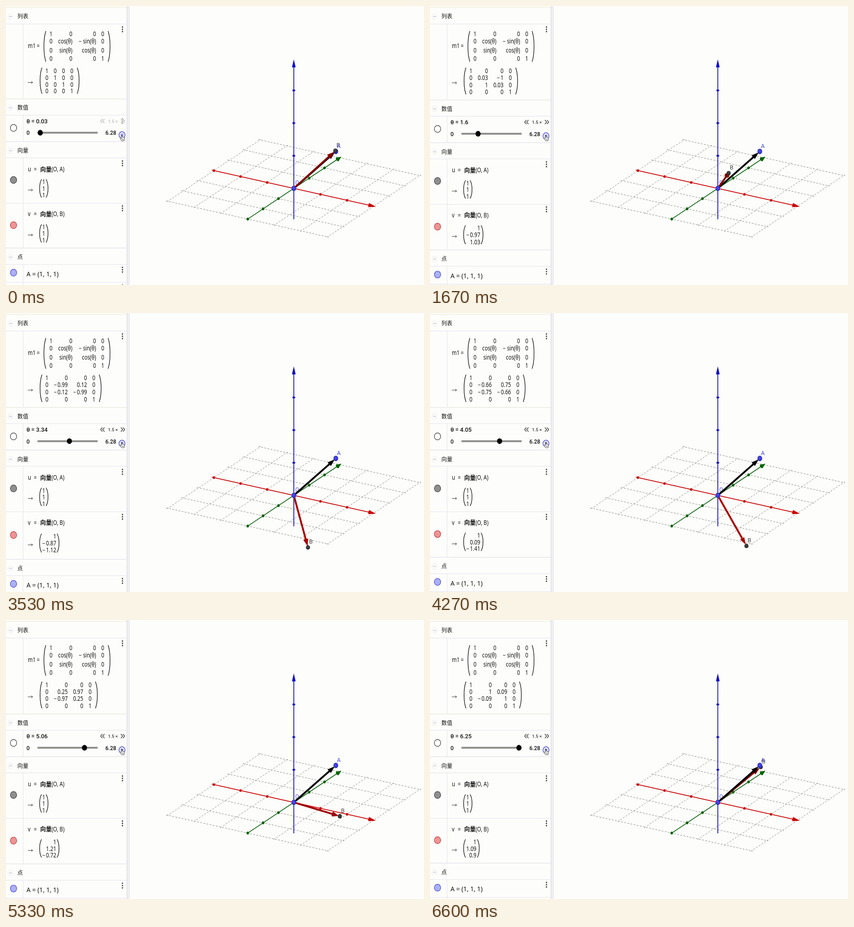
Write an HTML page with a canvas that moves like this. It is 917 px wide and 611 px high and loops after 6.67 s.

```html
<!DOCTYPE html>
<html lang="zh-CN">
<head>
<meta charset="utf-8">
<style>
  html, body { margin: 0; width: 100%; height: 100%; overflow: hidden; background: #fdfdfb; }
  canvas { display: block; }
</style>
</head>
<body>
<canvas id="stage" width="917" height="611"></canvas>
<script>
const c = document.getElementById('stage').getContext('2d');
const LOOP = 6670;
const UI = 'Roboto, "Liberation Sans", Arial, sans-serif';
const MATH = '"Noto Sans", "Open Sans", sans-serif';
const CJK = '"Noto Sans CJK SC", "Noto Sans CJK JP", sans-serif';
const SQUEEZE = 0.82; // aspect of the math type
const MATH_SIZE = 13.7;
const INK = '#111';

// step, slider angle, drawn angle, angle in the matrices (which lag behind)
const KEYS = [
  [0, .03, .03, 0], [11, .72, .72, .657], [25, 1.6, 1.6, 1.541], [42, 2.64, 2.61, 2.54],
  [64, 4.05, 4.02, 3.991], [80, 5.06, 5.03, 4.96], [99, 6.25, 6.22, 6.19]
];

function anglesAt(n) {
  const i = Math.max(1, KEYS.findIndex(k => k[0] >= n));
  const a = KEYS[i - 1], b = KEYS[i], f = (n - a[0]) / (b[0] - a[0]);
  return [1, 2, 3].map(j => a[j] + (b[j] - a[j]) * f);
}

// ---- drawing helpers ----
function text(s, x, y, size = 12.8, family = UI, color = INK, align = 'left', weight = 500) {
  c.font = `${weight} ${size}px ${family}`;
  c.fillStyle = color;
  c.textAlign = align;
  c.fillText(s, x, y + size * .36);
}

function math(s, x, y, align = 'left') {
  c.save();
  c.translate(x, y);
  c.scale(SQUEEZE, 1);
  text(s, 0, 0, MATH_SIZE, MATH, INK, align, 400);
  c.restore();
}

function mathWidth(s) {
  c.font = `400 ${MATH_SIZE}px ${MATH}`;
  return c.measureText(s).width * SQUEEZE;
}

function line(x0, y0, x1, y1, color, width = 1, dash = []) {
  c.strokeStyle = color;
  c.lineWidth = width;
  c.setLineDash(dash);
  c.beginPath();
  c.moveTo(x0, y0);
  c.lineTo(x1, y1);
  c.stroke();
  c.setLineDash([]);
}

function poly(points, color, width = 1.3) {
  c.strokeStyle = color;
  c.lineWidth = width;
  c.beginPath();
  points.forEach(p => c.lineTo(...p));
  c.stroke();
}

function oval(x, y, rx, ry, fill, stroke, width = 1.2) {
  c.beginPath();
  c.ellipse(x, y, rx, ry, 0, 0, 7);
  c.fillStyle = fill;
  c.fill();
  if (!stroke) return;
  c.strokeStyle = stroke;
  c.lineWidth = width;
  c.stroke();
}

function paren(x, top, bottom, dir) {
  const bend = (bottom - top) * .25, e = x + 4.5 * dir, m = x - 1.2 * dir;
  c.strokeStyle = INK;
  c.lineWidth = 1.3;
  c.beginPath();
  c.moveTo(e, top);
  c.bezierCurveTo(m, top + bend, m, bottom - bend, e, bottom);
  c.stroke();
}

function yields(y) {
  line(48, y, 58, y, '#333');
  poly([[55.5, y - 2.5], [58.5, y], [55.5, y + 2.5]], '#333', 1);
}

function dots(y, color = '#444') {
  for (const d of [-5, 0, 5]) oval(255.5, y + d, 1.5, 1.7, color);
}

const fmt = v => String(+v.toFixed(2) || 0).replace('-', '−\u2009');
const hasMinus = row => row.some(s => s[0] === '−');

// ---- panel ----
function rule(y, color = '#d6d6ea') {
  line(0, y, 265, y, color, 1, [2, 1]);
}

function header(s, y) {
  c.setLineDash([2, 1.5]);
  oval(10, y, 5.5, 6, '#fdfdfb', '#dcdce4', 1);
  c.setLineDash([]);
  line(7, y, 13, y, '#a8a8c4', 1.1);
  text(s, 25, y, 12, CJK);
}

function gutter(y0, y1) {
  line(37.5, y0, 37.5, y1, '#d8d8e4', 1, [2, 1]);
}

function vectorRow(name, point, y, column, nudge = 0, lag = 0) {
  math(name, 48, y);
  math('=', 61, y);
  text('向量', 75, y, 12.6, CJK, INK, 'left', 700);
  math(`(O, ${point})`, 100, y);
  yields(y + 46 + lag);
  const right = 79.5 + Math.max(...column.map(mathWidth));
  let rowY = y + 28.5 + nudge;
  const top = rowY - 6;
  column.forEach((s, i) => {
    math(s, right, rowY, 'right');
    if (i < 2) rowY += 14.5 + (hasMinus([s]) ? 1.3 : 0);
  });
  paren(73.5, top, rowY + 5, 1);
  paren(right + 6.5, top, rowY + 5, -1);
}

function matrixRow(a) {
  math('m1', 48, 87);
  math('=', 67.5, 87);
  paren(83, 55, 122, 1);
  paren(228.5, 55, 122, -1);
  const formula = [['1', '0', '0', '0'], ['0', 'cos(θ)', '− sin(θ)', '0'],
    ['0', 'sin(θ)', 'cos(θ)', '0'], ['0', '0', '0', '1']];
  formula.forEach((row, i) => row.forEach((s, j) =>
    math(s, [102, 145.5, 197.5, 215.5][j], [61, 77.5, 97, 115][i], 'right')));

  const co = Math.cos(a), si = Math.sin(a);
  const rows = [[1, 0, 0, 0], [0, co, -si, 0], [0, si, co, 0], [0, 0, 0, 1]].map(r => r.map(fmt));
  const minuses = rows.filter(hasMinus).length;
  const rights = [];
  let x = 74.8;
  for (let j = 0; j < 4; j++) {
    x += 11.8 + Math.max(...rows.map(r => mathWidth(r[j])));
    rights.push(x);
  }
  let y = 142.3;
  for (const row of rows) {
    row.forEach((s, j) => math(s, rights[j], y, 'right'));
    y += 14.7 + (hasMinus(row) ? 1.3 : 0);
  }
  paren(74.5, 135, y - 9, 1);
  paren(x + 13, 135, y - 9, -1);
  yields(167.5 + minuses * .7);
  return [0, 2.3, 3.2][minuses];
}

function chevrons(x, y, dir, color) {
  for (const d of [0, 4.5])
    poly([[x + d + 2 * dir, y - 4.5], [x + d - 2 * dir, y], [x + d + 2 * dir, y + 4.5]], color);
}

function sliderRow(angle, s, idle) {
  const tone = idle ? '#b8b8b8' : '#333';
  oval(16.5, 267 + s, 7, 7.6, '#fff', '#333');
  text('θ = ' + fmt(angle), 45, 252 + s);
  chevrons(209.5, 252 + s, 1, tone);
  text('1.5 ×', 234.5, 252.5 + s, 9.8, UI, tone, 'center');
  chevrons(254, 252 + s, -1, tone);
  if (idle) dots(252, '#aaa');
  text('0', 45, 278 + s, 12.2);
  line(69, 277.5 + s, 201, 277.5 + s, '#8c8c88', 4);
  oval(74.6 + 19.28 * angle, 277.5 + s, 5.6, 6.2, '#000');
  text('6.28', 218, 278 + s, 12);
  oval(254.5, 282.5 + s, 6.5, 7.2, '#fff', '#4a4ac8', 1.5);
  line(252.7, 279 + s, 252.7, 286 + s, '#4a4ac8', 1.6);
  line(256.3, 279 + s, 256.3, 286 + s, '#4a4ac8', 1.6);
}

function hand() {
  c.beginPath();
  [[253, 283], [254.6, 283], [255, 287], [259, 288], [260, 290], [259, 295],
    [253.5, 295], [250.5, 290.5], [251.5, 289.5], [253, 290.5]].forEach(p => c.lineTo(...p));
  c.closePath();
  c.fillStyle = '#fff';
  c.fill();
  c.strokeStyle = '#444';
  c.lineWidth = 1;
  c.stroke();
  line(255, 290.5, 255, 293, '#555');
  line(257, 290.5, 257, 293, '#555');
}

function panel(angle, lagged, idle) {
  rule(3, '#dedeb0');
  header('列表', 23);
  rule(39.5);
  dots(51);
  const s = matrixRow(lagged);
  gutter(40, 203 + s);
  rule(203.5 + s, '#d4d4c0');
  header('数值', 223 + s);
  rule(239 + s);
  gutter(239 + s, 297 + s);
  sliderRow(angle, s, idle);
  rule(297 + s, '#c8c8e0');
  header('向量', 317 + s);
  rule(332.5 + s);

  const co = Math.cos(lagged), si = Math.sin(lagged);
  const column = [1, co - si, si + co].map(fmt);
  const minuses = column.filter(v => hasMinus([v])).length;
  const extra = [0, 1.8, 6][minuses], end = s + extra;
  gutter(333 + s, 530 + end);
  oval(16.5, 381 + s, 7, 7.6, '#8f8f8f', '#444');
  vectorRow('u', 'A', 357 + s, ['1', '1', '1']);
  dots(344.5 + s);
  rule(432 + s);
  oval(16.5, 480 + s + extra / 2, 7, 7.6, '#ee9494', '#c23c3c');
  vectorRow('v', 'B', 455.5 + s, column, minuses === 2 ? 2 : 0, extra / 2);
  dots(443 + s);
  rule(530 + end, '#c8c8e0');
  header('点', 550 + end);
  rule(566 + end);
  gutter(566 + end, 611);
  oval(16.5, 584 + end, 7, 7.6, '#aab0fa', '#4a4ad0');
  text('A = (1, 1, 1)', 45, 587 + end, 13.8, MATH);
  dots(577.5 + end);
  rule(605 + end);
  dots(616.5 + end);
  hand();

  c.fillStyle = '#f1f1f6';
  c.fillRect(265, 0, 6, 611);
  line(265.5, 0, 265.5, 611, '#d2d2de');
  line(270.5, 0, 270.5, 611, '#dedee6');
}

// ---- 3D view ----
const OX = 631.4, OY = 399.4;
const project = (x, y, z) => [OX + 58.4 * x + 33.7 * y, OY + 13 * x - 22.4 * y - 71.5 * z];

function cone(base, tip, r, depth, color) {
  const dx = tip[0] - base[0], dy = tip[1] - base[1];
  c.save();
  c.translate(...base);
  c.rotate(Math.atan2(dy, dx));
  oval(0, 0, r * depth, r, color);
  c.beginPath();
  c.moveTo(0, -r);
  c.lineTo(Math.hypot(dx, dy), 0);
  c.lineTo(0, r);
  c.fill();
  c.restore();
}

function ball(p, rx, ry, light, dark) {
  const g = c.createRadialGradient(p[0] - 1, p[1] - 1, 1, ...p, ry);
  g.addColorStop(0, light);
  g.addColorStop(1, dark);
  oval(...p, rx, ry, g);
}

function vector(p, color) {
  const dx = p[0] - OX, dy = p[1] - OY;
  const at = f => [OX + dx * f, OY + dy * f];
  const base = at(.85), flat = Math.min(1, Math.hypot(dx, dy) / 125);
  line(OX, OY, ...base, color, 4);
  cone(base, at(.975), 5.2, Math.sqrt(1 - flat * flat), color);
}

function axes() {
  for (const k of [-3, -2, -1, 1, 2, 3]) {
    line(...project(k, -3.05, 0), ...project(k, 3.07, 0), '#85857e', 1, [4, 3]);
    line(...project(-3.07, k, 0), ...project(3.05, k, 0), '#85857e', 1, [4, 3]);
  }
  const red = '#c80404', green = '#0a640a', blue = '#1010c8';
  line(...project(-3.08, 0, 0), ...project(2.84, 0, 0), red, 1.7);
  line(...project(0, -3, 0), ...project(0, 2.84, 0), green, 1.7);
  line(...project(0, 0, -.95), ...project(0, 0, 3.72), blue, 1.8);
  for (const k of [-3, -2, -1, 1, 2]) {
    oval(...project(k, 0, 0), 2.3, 3, red);
    oval(...project(0, k, 0), 2.9, 3.1, green);
  }
  for (const k of [1, 2, 3]) oval(...project(0, 0, k), 3.1, 2.1, blue);
  cone(project(2.83, 0, 0), project(3.08, 0, 0), 4.4, .4, red);
  cone(project(0, 2.84, 0), project(0, 3.1, 0), 4.6, .6, green);
  cone(project(0, 0, 3.72), project(0, 0, 3.95), 3.9, .3, blue);
}

function view(angle) {
  const co = Math.cos(angle), si = Math.sin(angle);
  const A = project(1, 1, 1), B = project(1, co - si, si + co);
  const label = (s, p, color) => text(s, p[0] + 6.5, p[1] - 12.5, 12.6, UI, color, 'center', 400);
  axes();
  label('O', [OX + 1, OY], '#5c5cd4');
  label('B', B, '#444');
  label('A', A, '#4c4cdc');

  const drawA = () => {
    vector(A, '#000');
    ball(A, 5.2, 5.9, '#4a4af0', '#2a2ab8');
  };
  const drawB = () => {
    vector(B, `rgb(${Math.round(150 - 15 * (si + co))},0,0)`);
    ball(B, 4.5, 4.9, '#484848', '#222');
  };
  if (angle < Math.PI) { drawA(); drawB(); } else { drawB(); drawA(); }
  ball([OX, OY], 5.2, 5.9, '#4a4af0', '#2a2ab8');
}

// ---- clock: 15 steps a second, each start rounded to 10 ms ----
const stepStart = n => Math.round(n * 20 / 3) * 10;

function frame() {
  const t = performance.now() % LOOP;
  let n = Math.min(99, Math.ceil(t * 3 / 200));
  while (n > 0 && stepStart(n) > t) n--;
  const [angle, drawn, lagged] = anglesAt(n);
  c.fillStyle = '#fdfdfb';
  c.fillRect(0, 0, 917, 611);
  view(drawn);
  panel(angle, lagged, n === 0);
  requestAnimationFrame(frame);
}
frame();
</script>
</body>
</html>
```
